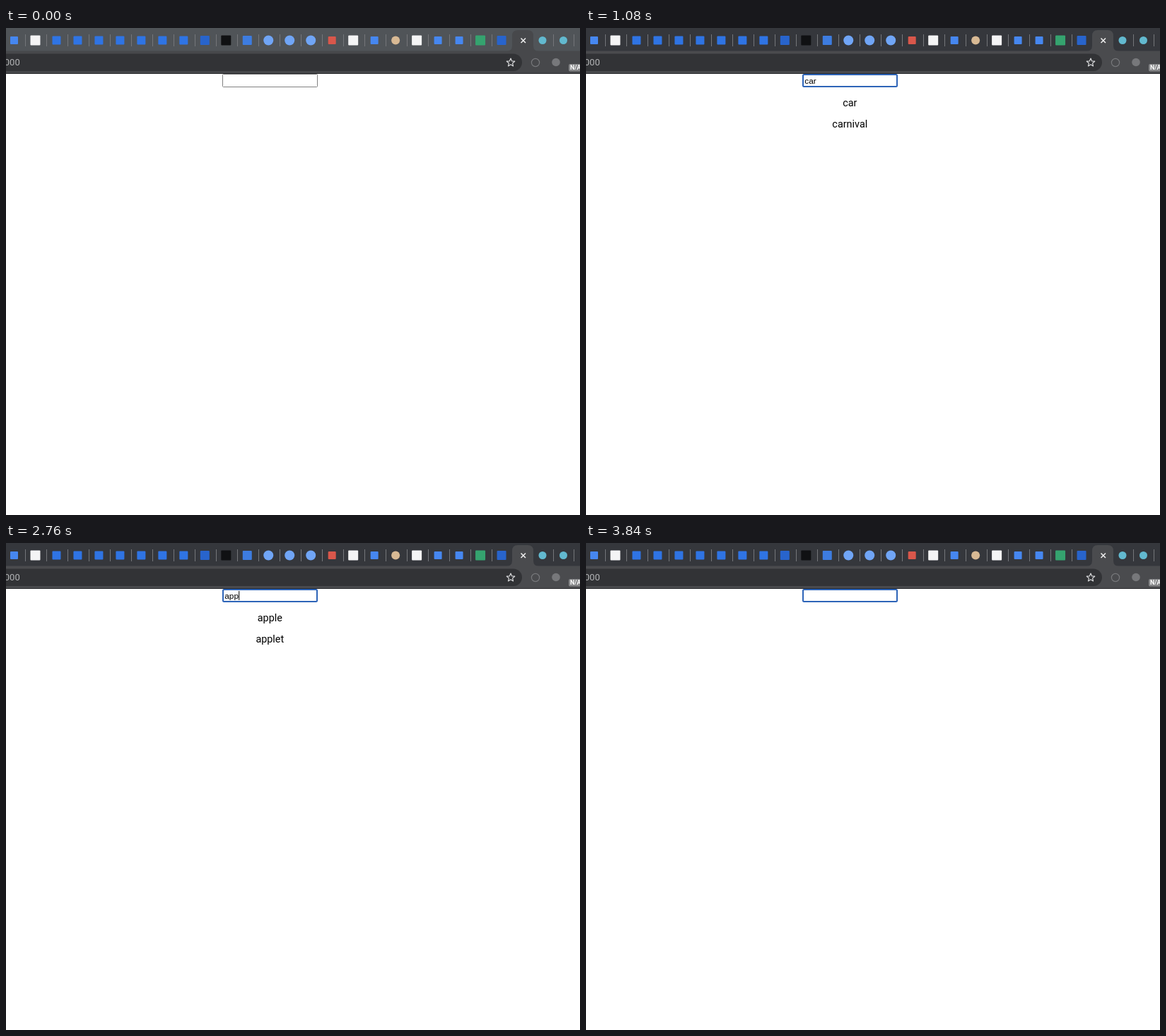
An HTML page that plays this animation: 812x690 px, repeating every 3930 ms.

```html
<!DOCTYPE html>
<html lang="en">
<head>
<meta charset="utf-8">
<title>Word search</title>
<style>
html, body { margin: 0; width: 100%; height: 100%; overflow: hidden; background: #fff; }
svg { display: block; }
#query { font: 11.8px "Liberation Sans", Arial, sans-serif; }
.word { font: 14.4px Roboto, Inter, sans-serif; text-anchor: middle; }
</style>
</head>
<body>
<svg width="812" height="690">
  <rect width="812" height="690" fill="#fff"/>
  <rect id="strip" width="812" height="34"/>
  <g id="tabs"></g>
  <g class="bar">
    <path d="M708 33q8 0 8-8V11q0-8 8-8h14q8 0 8 8v14q0 8 8 8z"/>
    <rect y="32.5" width="812" height="32.5"/>
  </g>
  <path d="M728.5 14.5l6.5 6.5m0-6.5l-6.5 6.5" stroke="#f1f1f1" stroke-width="1.5"/>
  <rect x="-30" y="36.5" width="760" height="24.5" rx="12.25" fill="#323336"/>
  <text x="-2.2" y="53" fill="#b4b5b7" font-family="Roboto, sans-serif" font-size="13">000</text>
  <path d="M714 43l1.6 3.8 4.1.4-3.1 2.7.9 4-3.5-2.1-3.5 2.1.9-4-3.1-2.7 4.1-.4z"
    fill="none" stroke="#d8d9db" stroke-width="1.2" stroke-linejoin="round"/>
  <circle cx="749" cy="49" r="5.6" fill="none" stroke="#77787b" stroke-width="1.2"/>
  <circle cx="778" cy="48.5" r="5.8" fill="#77787b"/>
  <rect x="796" y="51" width="22" height="10.5" rx="2" fill="#858688"/>
  <text x="798" y="59.3" fill="#fff" font-family="Roboto, sans-serif" font-size="8.8" font-weight="700">N/A</text>
  <rect y="64" width="812" height="1" fill="#252629"/>
  <rect id="field" fill="#fff"/>
  <text id="query" x="309.3" y="79"></text>
  <rect id="caret" y="68" width="1" height="13"/>
  <text class="word" x="373.3" y="111.3"></text>
  <text class="word" x="373.3" y="141.3"></text>
</svg>
<script>
const $ = id => document.getElementById(id);
const words = ['car', 'carnival', 'apple', 'applet'];
const rows = document.querySelectorAll('.word');
const bar = document.querySelector('.bar');
const LOOP = 3930, WAKE = 120, FOCUS = 420;

// [time, text in the field]
const typing = [[0, ''], [600, 'c'], [690, 'ca'], [780, 'car'], [1500, 'carn'], [2190, ''],
  [2520, 'a'], [2610, 'ap'], [2700, 'app'], [2790, 'appl'], [2880, 'apple'], [3060, 'applet'], [3360, '']];
// [time, caret visible]
const blink = [[0, 0], [FOCUS, 1], [1050, 0], [1140, 1], [1830, 0], [2190, 1], [3720, 0]];

// Tab icons: [colour, size, round]
const icons = {
  a: ['#4687f0', 11], w: ['#f4f4f5', 14], c: ['#2f74e4', 12], b: ['#2864cc', 13],
  k: ['#101113', 14], d: ['#3d7ce0', 13], z: ['#70a5f6', 14, 1], r: ['#d9574b', 11],
  t: ['#d8b994', 12, 1], g: ['#35a36f', 14], e: ['#62b9cf', 11, 1]
};

function set(el, attrs) {
  for (const key in attrs) el.setAttribute(key, attrs[key]);
}

function addRect(attrs) {
  const el = document.createElementNS('http://www.w3.org/2000/svg', 'rect');
  set(el, attrs);
  $('tabs').append(el);
}

function icon(key, x) {
  const [fill, size, round] = icons[key];
  addRect({ x: x - size / 2, y: 17.5 - size / 2, width: size, height: size, rx: round ? size / 2 : 1, fill });
}

function divider(x) {
  addRect({ x, y: 9, width: 1, height: 17, fill: '#74767a' });
}

[...'awcccccccbkdzzzrwatwaagb'].forEach((key, i) => {
  icon(key, 11.5 + i * 29.98);
  if (i < 23) divider(27 + i * 30);
});
icon('e', 759);
icon('e', 788.5);
divider(774);
divider(803);

const at = (steps, t) => steps.findLast(s => s[0] <= t)[1];

function draw(now) {
  const t = now % LOOP, awake = t >= WAKE, focused = t >= FOCUS;
  const text = at(typing, t);
  set($('strip'), { fill: awake ? '#35373c' : '#505458' });
  set(bar, { fill: awake ? '#4a4b4e' : '#47484b' });

  const inset = focused ? 1 : .5;
  set($('field'), {
    x: 306 + inset, y: 65 + inset, width: 135 - 2 * inset, height: 19 - 2 * inset,
    rx: focused ? 1.5 : 1, stroke: focused ? '#2d64b8' : '#808080', 'stroke-width': 2 * inset
  });

  $('query').textContent = text;
  set($('caret'), { x: 309.5 + $('query').getComputedTextLength(), opacity: at(blink, t) });

  const found = text ? words.filter(w => w.startsWith(text)) : [];
  rows.forEach((row, i) => row.textContent = found[i] || '');
}

const start = performance.now();
function tick() {
  draw(performance.now() - start);
  requestAnimationFrame(tick);
}
tick();
</script>
</body>
</html>
```
